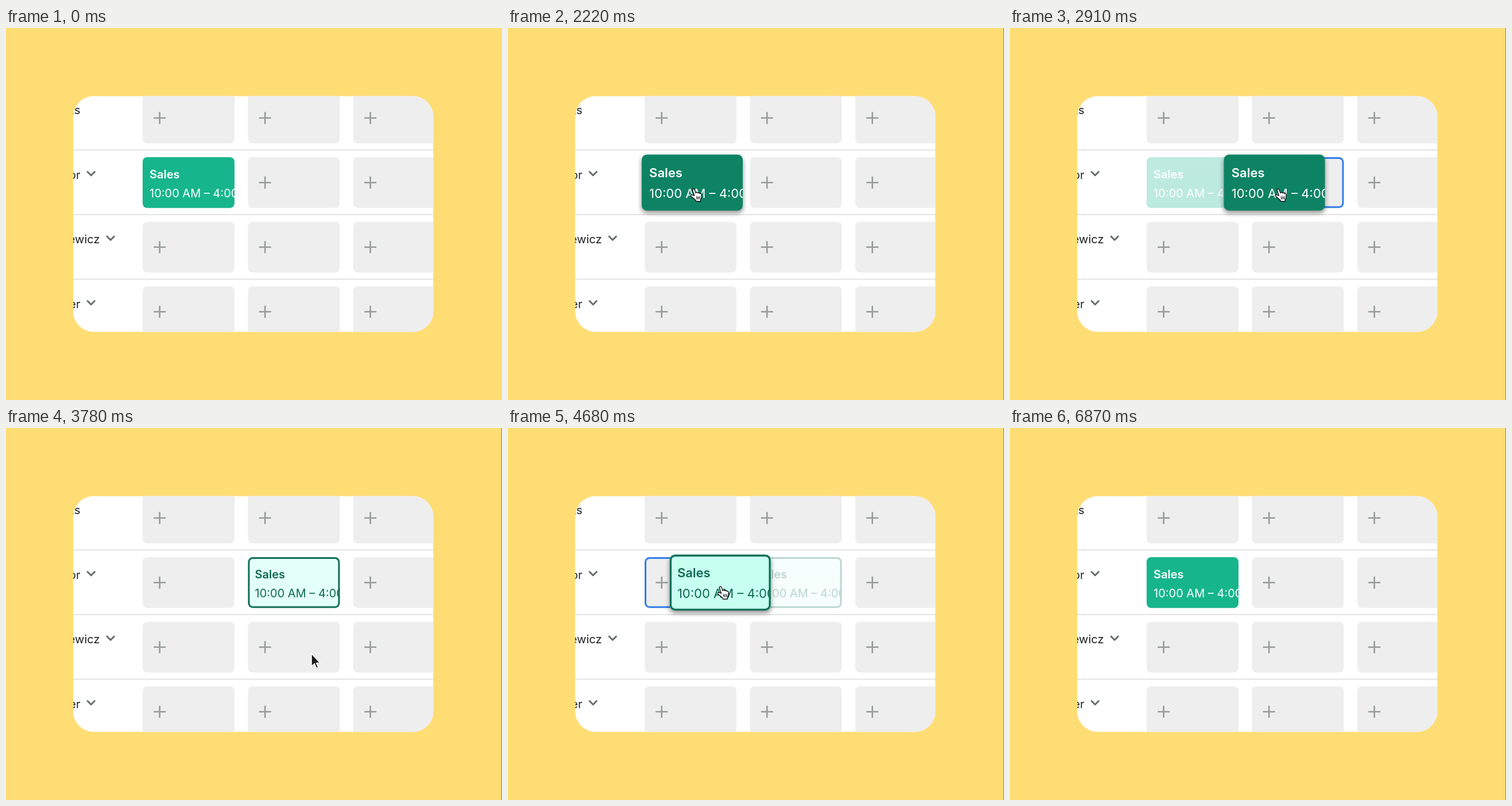
An HTML page for the animation above (7080 ms loop, 864x648 px).

```html
<!DOCTYPE html>
<html lang="en">
<head>
<meta charset="utf-8">
<title>Shift planner</title>
<style>
  html, body { margin: 0; width: 100%; height: 100%; overflow: hidden; background: #ffdd75; }
  svg { display: block; width: 864px; height: 648px; }
  text { font: 400 20px Inter, "Open Sans", sans-serif; }
  .bold { font-weight: 600; }
  .name { fill: #1f2121; text-anchor: end; }
  .line { fill: none; stroke-linecap: round; stroke-linejoin: round; }
  .shadow { filter: blur(4px); }
</style>
</head>
<body>
<svg viewBox="0 0 864 648" xmlns="http://www.w3.org/2000/svg">
  <defs>
    <clipPath id="panel"><rect x="117" y="118.5" width="627.5" height="411" rx="36"/></clipPath>
    <clipPath id="cardClip"><rect x="-80" y="-44.25" width="160" height="88.5" rx="8"/></clipPath>
  </defs>
  <rect width="864" height="648" fill="#ffdd75"/>
  <rect id="edge" x="863" width="1" height="648" fill="#8c7c4b"/>
  <g clip-path="url(#panel)">
    <rect x="117" y="118.5" width="627.5" height="411" fill="#fff"/>
    <g id="grid"></g>
    <rect id="drop" y="226.5" width="157" height="85.5" rx="7" fill="none" stroke="#307de9" stroke-width="3"/>
    <g id="cards"></g>
  </g>
  <g id="arrow">
    <path d="M0 0V22.5L5.2 17.6L8.6 25.5L12 24L8.7 16.4H15.5Z" fill="#000" opacity=".25"
      transform="translate(.5 1.5)" class="shadow" style="filter:blur(1.2px)"/>
    <path d="M0 0V22.5L5.2 17.6L8.6 25.5L12 24L8.7 16.4H15.5Z" fill="#1c1c1f" stroke="#fff" stroke-width="1.6"/>
  </g>
  <g id="hand">
    <path d="M7.6 13L4.6 4.2C3.6 1.2 7 .2 8.1 2.8L10.2 8.6C11 6.6 13.4 6.8 13.8 8.6C14.8 7.2 16.8 7.6 17 9.4C18.4 8.4 20 9.4 20.2 11C20.6 14.6 20.4 17 18.6 19.6L18.4 23H10.6L10 21C7.6 19 5 16.4 2.2 14.6C.4 13 2 10.9 4 11.7Z"
      fill="#fff" stroke="#111" stroke-width="1.4" stroke-linejoin="round"/>
    <path class="line" d="M11.6 14.5L12 19M14.3 14.5V19M17 14.5L16.7 19" stroke="#111" stroke-width="1.2"/>
  </g>
</svg>
<script>
const LOOP = 7080, STEP = 30;
const COL = 183.5, ROW = 112.5, LEFT = 238, MID = 269.25;
const PICK1 = 1680, DROP1 = 3130, PICK2 = 3960, DROP2 = 4990;

const $ = id => document.getElementById(id);
function add(parent, tag, attrs, text) {
  const el = document.createElementNS('http://www.w3.org/2000/svg', tag);
  set(el, attrs);
  if (text) el.textContent = text;
  parent.appendChild(el);
  return el;
}
function set(el, attrs) {
  for (const k in attrs) el.setAttribute(k, attrs[k]);
}
const show = (el, on) => set(el, { visibility: on ? 'visible' : 'hidden' });

const clamp = v => Math.min(1, Math.max(0, v));
const lerp = (a, b, p) => a + (b - a) * p;
const smooth = p => p * p * (3 - 2 * p);
const easeIn = p => p * p;
const easeOut = p => 1 - (1 - p) * (1 - p);
const ramp = (t, a, b, ease = smooth) => ease(clamp((t - a) / (b - a)));
const mix = (a, b, p) => a.map((v, i) => lerp(v, b[i], p));
const rgb = c => `rgb(${c.map(Math.round)})`;

const SOLID = [23, 181, 140], SOLID_HOVER = [13, 131, 100];
const PALE = [227, 255, 250], PALE_HOVER = [199, 255, 240];
const WHITE = [255, 255, 255], INK = [14, 104, 82];

// Static timetable
const cells = [];
const names = [['ks', 129.5], ['or', 129.5], ['ewicz', 163.5], ['er', 129.5]];
names.forEach(([name, x], r) => {
  const y = 112.5 + r * ROW;
  if (r) add($('grid'), 'rect', { x: 117, y: y - 13.2, width: 628, height: 1.5, fill: '#dadada' });
  add($('grid'), 'text', { class: 'name', x, y: y + 37.5 }, name);
  if (r) add($('grid'), 'path', {
    class: 'line', d: `M${x + 12.5} ${y + 25.5}l6.2 6.2l6.2 -6.2`, stroke: '#646a6a', 'stroke-width': 2.9
  });
  for (let c = 0; c < 3; c++) {
    const g = add($('grid'), 'g', { transform: `translate(${LEFT + c * COL} ${y})` });
    add(g, 'rect', { width: 160, height: 88.5, rx: 8, fill: '#eee' });
    add(g, 'path', { d: 'M19.2 44.2h21M29.7 33.7v21', stroke: '#979b9b', 'stroke-width': 2.6 });
    if (r === 1) cells.push(g);
  }
});

function makeCard() {
  const box = { x: -80, y: -44.25, width: 160, height: 88.5, rx: 8 };
  const g = add($('cards'), 'g', {});
  const shadow = add(g, 'rect', { ...box, y: -40.5, class: 'shadow' });
  const fill = add(g, 'rect', box);
  const clip = add(g, 'g', { 'clip-path': 'url(#cardClip)' });
  const text = add(clip, 'g', {});
  add(text, 'text', { class: 'bold', x: -68, y: -7.25 }, 'Sales');
  add(text, 'text', { x: -68, y: 25.25 }, '10:00 AM – 4:00 PM');
  const border = add(g, 'rect', {
    x: -78.5, y: -42.75, width: 157, height: 85.5, rx: 7,
    fill: 'none', stroke: '#0e6f56', 'stroke-width': 3
  });
  return { g, shadow, fill, text, border };
}
function drawCard(card, x, lift, hover, pale) {
  set(card.g, { transform: `translate(${x} ${MID}) scale(${1 + 0.1 * lift})` });
  set(card.shadow, { opacity: 0.45 * lift });
  set(card.fill, { fill: rgb(mix(mix(SOLID, SOLID_HOVER, hover), mix(PALE, PALE_HOVER, hover), pale)) });
  set(card.text, { fill: rgb(mix(WHITE, INK, pale)), transform: `translate(0 ${-lift})` });
  set(card.border, { opacity: pale });
}
const ghost = makeCard(), card = makeCard();
set(ghost.g, { opacity: 0.28 });

// Pointer legs: start, end, x, y, ease
const legs = [
  [870, 1560, 320, 280, easeOut],
  [2137, 3250, 509, 280, smooth],
  [3150, 3390, 551.5, 469, smooth],
  [3600, 4020, 502, 276, smooth],
  [4080, 5003, 318, 276, smooth],
  [5080, 5520, 400, 650, easeIn]
];
function pointer(t) {
  let x = 388, y = 568;
  for (const [a, b, tx, ty, ease] of legs) {
    const p = ramp(t, a, b, ease);
    x = lerp(x, tx, p);
    y = lerp(y, ty, p);
  }
  return { x, y };
}

function draw(t) {
  const tip = pointer(t);
  const first = t >= PICK1 && t < DROP1;
  const second = t >= PICK2 && t < DROP2;
  const home = t >= DROP1 && t < DROP2 ? 1 : 0;
  const x = LEFT + 80 + COL * (ramp(t, 2137, 3250) - ramp(t, 4080, 5003));
  const lift = ramp(t, PICK1, 1890) - ramp(t, DROP1, 3260) + ramp(t, PICK2, 4080) - ramp(t, DROP2, 5100);
  const hover = ramp(t, 1320, 1440) - ramp(t, 3210, 3300) + ramp(t, 3890, 3990) - ramp(t, 5200, 5290);
  const pale = ramp(t, DROP1, 3260) - ramp(t, DROP2, 5100);

  show($('edge'), t >= STEP);
  cells.forEach((cell, c) => show(cell, c !== home));
  drawCard(card, x, lift, hover, pale);
  show(ghost.g, first || second);
  drawCard(ghost, LEFT + 80 + home * COL, 0, 0, home);

  const goal = first ? 1 : 0;
  set($('drop'), { x: LEFT + 1.5 + goal * COL });
  show($('drop'), first && tip.x > LEFT + COL || second && tip.x < LEFT + 160);

  const visible = t >= 870 && t < 5520;
  const onCard = first || second || tip.y < 314;
  set($('hand'), { transform: `translate(${tip.x - 6} ${tip.y - 1})` });
  set($('arrow'), { transform: `translate(${tip.x} ${tip.y})` });
  show($('hand'), visible && onCard);
  show($('arrow'), visible && !onCard);
}

const start = performance.now();
function frame() {
  const t = (performance.now() - start) % LOOP;
  draw(Math.floor(t / STEP) * STEP);
  requestAnimationFrame(frame);
}
draw(0);
requestAnimationFrame(frame);
</script>
</body>
</html>
```
